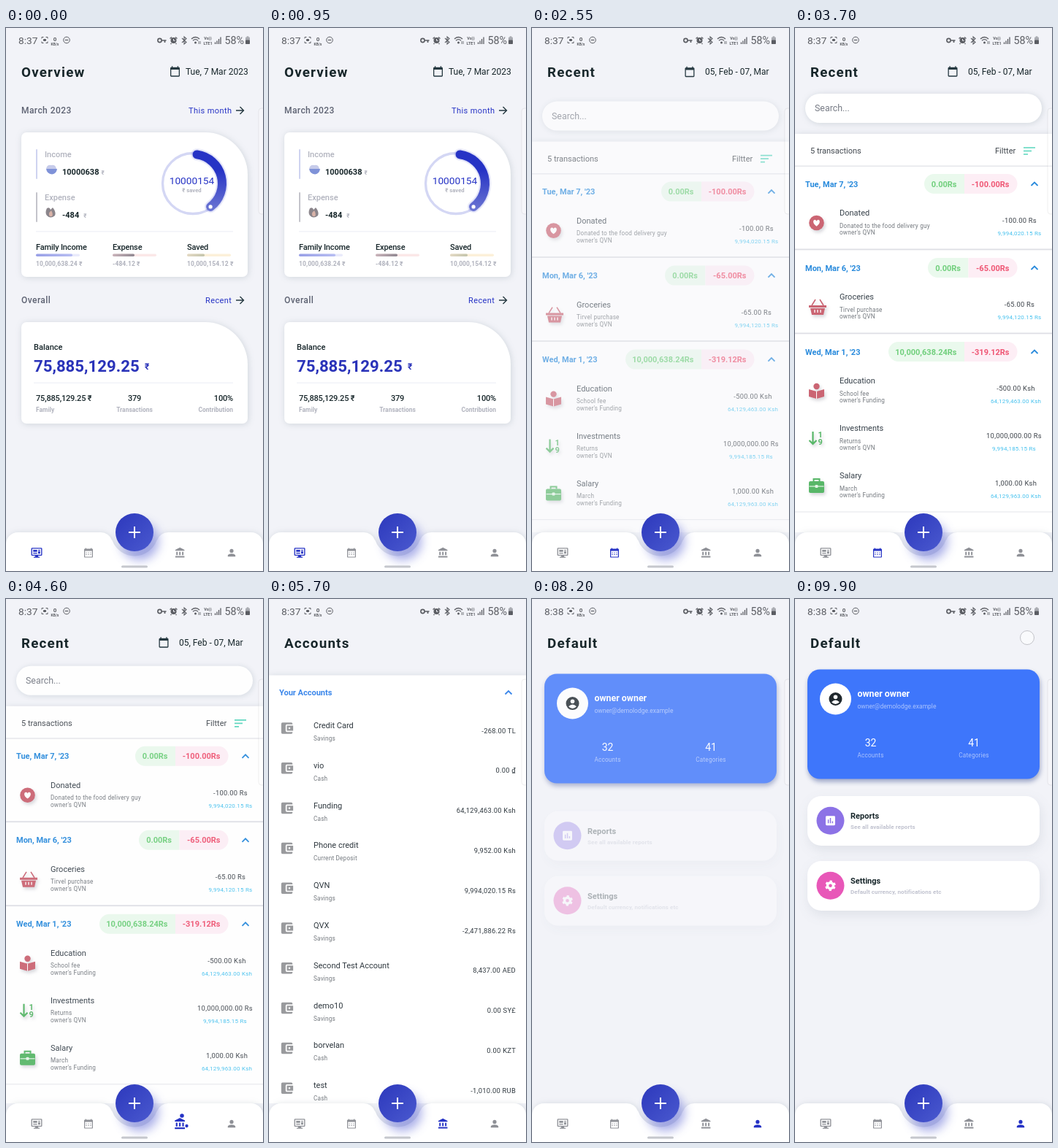
An HTML page for the animation above (10 s loop, 352 by 744 pixels).

```html
<!DOCTYPE html>
<html lang="en">
<head>
<meta charset="utf-8">
<title>Finance app</title>
<style>
  html, body { margin: 0; width: 100%; height: 100%; overflow: hidden; background: #f2f3f8; }
  svg { display: block; width: 100vw; height: 100vh; font-family: Roboto, sans-serif; }
  text { white-space: pre; }
  .card { filter: drop-shadow(1px 1px 4px rgba(58, 81, 96, .18)); }
  .raised { filter: drop-shadow(1px 4px 3px rgba(50, 70, 140, .45)); }
  .option { filter: drop-shadow(2px 6px 8px rgba(58, 81, 96, .1)); }
  .glow { filter: drop-shadow(7px 12px 7px rgba(38, 51, 197, .4)); }
  .soft { filter: drop-shadow(2px 3px 2px rgba(60, 60, 80, .2)); }
</style>
</head>
<body>
<svg id="stage" viewBox="0 0 352 744" xmlns="http://www.w3.org/2000/svg"></svg>
<script>
const INK = '#17262a', BLUE = '#2633c5', GREY = '#b1b3be', LINK = '#2a8bdc', MUTED = '#8f9197';
const BOLD = ' font-weight="700"', MEDIUM = ' font-weight="500"';
const END = ' text-anchor="end"', MID = ' text-anchor="middle"';
const track = n => ` letter-spacing="${n}"`;

const text = (x, y, s, size = 11, fill = INK, attrs = '') =>
  `<text x="${x}" y="${y}" font-size="${size}" fill="${fill}"${attrs}>${s}</text>`;
const rect = (x, y, w, h, fill, r = 0, attrs = '') =>
  `<rect x="${x}" y="${y}" width="${w}" height="${h}" rx="${r}" fill="${fill}" ${attrs}/>`;
const circle = (x, y, r, fill, attrs = '') => `<circle cx="${x}" cy="${y}" r="${r}" fill="${fill}" ${attrs}/>`;
const line = (d, stroke, width = 1, attrs = '') =>
  `<path d="${d}" fill="none" stroke="${stroke}" stroke-width="${width}" ${attrs}/>`;
const shape = (d, fill, attrs = '') => `<path d="${d}" fill="${fill}" ${attrs}/>`;
const at = (x, y, body, attrs = '') => `<g transform="translate(${x} ${y})" ${attrs}>${body}</g>`;
const icon = (d, x, y, scale, fill) =>
  shape(d, fill, `transform="translate(${x} ${y}) scale(${scale}) translate(-12 -12)"`);
const item = (from, body) => `<g class="item" data-from="${from}">${body}</g>`;
const page = (bar, body) => `<g class="page"><g class="bar">${bar}</g>${body}</g>`;
const title = s => text(21, 66.7, s, 18.8, INK, BOLD + track(1.2));
const chevron = (y, color) => line(`M323.5 ${y + 2.5}l4.5-4.5 4.5 4.5`, color, 1.8);
const arrow = y => line(`M315 ${y}h10.5m-5-5l5 5-5 5`, '#253840', 1.4);

const ICONS = {
  date: 'M20 3h-1V1h-2v2H7V1H5v2H4c-1.1 0-2 .9-2 2v16c0 1.1.9 2 2 2h16c1.1 0 2-.9 2-2V5c0-1.1-.9-2-2-2zm0 18H4V8h16v13z',
  monitor: 'M3 2h18a2 2 0 0 1 2 2v12a2 2 0 0 1-2 2h-6v2h3v2H6v-2h3v-2H3a2 2 0 0 1-2-2V4a2 2 0 0 1 2-2zm0 2v12h18V4zM5 6h8v4H5zM15 6h4v2h-4zM15 9h4v5h-4zM5 12h8v2H5z',
  bank: 'M4 10v7h3v-7zm6 0v7h3v-7zM2 22h19v-3H2zm14-12v7h3v-7zm-4.5-9L2 6v2h19V6z',
  person: 'M12 12a4 4 0 1 0 0-8 4 4 0 0 0 0 8zm0 2c-2.67 0-8 1.34-8 4v2h16v-2c0-2.66-5.33-4-8-4z',
  wallet: 'M21 18v1a2 2 0 0 1-2 2H5a2 2 0 0 1-2-2V5a2 2 0 0 1 2-2h14a2 2 0 0 1 2 2v1h-9a2 2 0 0 0-2 2v8a2 2 0 0 0 2 2zm-9-2h10V8H12zm4-2.5a1.5 1.5 0 1 1 0-3 1.5 1.5 0 0 1 0 3z',
  chart: 'M19 3H5a2 2 0 0 0-2 2v14a2 2 0 0 0 2 2h14a2 2 0 0 0 2-2V5a2 2 0 0 0-2-2zM9 17H7v-7h2zm4 0h-2V7h2zm4 0h-2v-4h2z'
};
const cells = [11, 15].map(y => [6, 11, 16].map(x => `M${x} ${y}h2v2h-2z`).join('')).join('');
const TABS = [
  { x: 42, d: ICONS.monitor, scale: .68 }, { x: 113, d: ICONS.date + cells, scale: .6 },
  { x: 238.5, d: ICONS.bank, scale: .66 }, { x: 309, d: ICONS.person, scale: .65 }
];

// Overview
const bigCard = (y, h) =>
  shape(`M28 ${y}H273a58 58 0 0 1 58 58V${y + h - 7}a7 7 0 0 1-7 7H28a7 7 0 0 1-7-7V${y + 7}a7 7 0 0 1 7-7z`, '#fff', 'class="card"');
const heading = (y, left, right, x) =>
  text(21, y, left, 12, '#5d6272', MEDIUM + track(.43)) + text(x, y, right, 11, BLUE, track(.4)) + arrow(y - 4);
const meter = (x, label, value, id, color) =>
  text(x, 304, label, 11, INK, MEDIUM + track(-.17)) + rect(x, 309.5, 60, 3.4, color, 1.7, 'opacity=".2"') +
  rect(x, 309.5, 0, 3.4, `url(#fade-${id})`, 1.7, `id="meter-${id}"`) + text(x, 326, value, 8.5, GREY, BOLD + track(.1));
const flow = (y, label, color, id, gap) =>
  rect(41, y, 2, 41, color, 1) + text(53, y + 11, label, 11, GREY, MEDIUM) +
  `<text x="77" y="${y + 34.5}" font-size="11" fill="${INK}" font-weight="700"><tspan id="${id}"></tspan>` +
  `<tspan dx="${gap}" font-size="8" fill="${GREY}">₹</tspan></text>`;
const pair = (x, value, label, anchor) =>
  text(x, 511, value, 11, INK, MEDIUM + track(-.17) + anchor) + text(x, 526, label, 8.5, GREY, BOLD + anchor);

const bowl = at(62, 194, shape('M-7-1Q-6-7 0-6Q6-7 7-1Z', '#c6cbea') + shape('M-7-1H8Q7 6 1 6.5Q-6 6-7-1Z', '#7f92d8'));
const flame = at(61, 253, shape('M-5-6Q-1-8 0-4L3-7Q8-1 6 4Q0 9-5 4Q-8 0-5-6Z', '#8b858b') +
  shape('M-1 5Q-4 1 1-3Q4 2 2 5Z', '#d9b3a8'));

const overview = page(
  title('Overview') + icon(ICONS.date, 231.5, 59.5, .65, '#253840') + text(246, 63.5, 'Tue, 7 Mar 2023', 12),
  item(0, heading(117, 'March 2023', 'This month', 250)) +
  item(.25, bigCard(143, 198) +
    flow(166, 'Income', '#cfd3f0', 'income', 3) + bowl + flow(225, 'Expense', '#c4c4cb', 'expense', 6) + flame +
    circle(256, 213, 41.5, 'none', 'stroke="#d4d7f4" stroke-width="3.4"') +
    ['#2633c512', '#2633c51c', 'url(#arc-fill)'].map((c, i) =>
      line('', c, [17, 14.5, 12][i], 'class="arc" stroke-linecap="round"')).join('') +
    circle(0, 0, 2.6, '#fff', 'id="knob"') +
    text(254.5, 214, '', 13.7, BLUE, MID + ' id="saved"') + text(254.5, 225, '₹ saved', 7.7, GREY, BOLD + MID) +
    rect(41, 278, 270, 1.6, '#f2f3f8') +
    meter(41, 'Family Income', '10,000,638.24 ₹', 'a', '#8f98e8') +
    meter(146, 'Expense', '-484.12 ₹', 'b', '#e88a8a') +
    meter(248, 'Saved', '10,000,154.12 ₹', 'c', '#f1b440')) +
  item(.37, heading(377, 'Overall', 'Recent', 273)) +
  item(.6, bigCard(403, 139) + text(38, 441, 'Balance', 11, INK, MEDIUM) +
    text(38, 471, '75,885,129.25', 22.2, '#2a33b9', BOLD) + text(190, 468, '₹', 12, '#2a33b9', BOLD) +
    rect(38, 485.5, 273, 1.6, '#f2f3f8') + pair(41, '75,885,129.25 ₹', 'Family', '') +
    pair(176, '379', 'Transactions', MID) + pair(311, '100%', 'Contribution', END)));

// Recent transactions
const RED = '#cb6573', GREEN = '#58b768';
const art = {
  heart: circle(0, 0, 10.3, RED) +
    shape('M0 5.5C-8 0-5-6-2-4.7Q0-4 0-2.5Q0-4 2-4.7C5-6 8 0 0 5.5Z', '#fff', 'transform="scale(.85)"'),
  basket: at(1.5, 1, shape('M-12-3H12V0H-12ZM-10 1H10L8 10H-8Z', RED) +
    line('M-8-3L-3-11M8-3L3-11', RED, 1.6) + line('M-4 3v4M0 3v4M4 3v4', '#fff', 1.3)),
  reader: circle(0, -6, 4.2, RED) + shape('M0 1L-10.5-2V8L0 11L10.5 8V-2Z', RED) + line('M0 1V11', '#fff', 1),
  growth: line('M-5-9V7M-10 3l5 5 5-5', GREEN, 2.2) + text(2, -1, '1', 11, GREEN, BOLD) + text(2, 9, '9', 11, GREEN, BOLD),
  briefcase: rect(-10.5, -6, 21, 16, GREEN, 2) + line('M-4-6V-9H4V-6', GREEN, 2) +
    line('M-10 1H10', '#e4f5e7', 1.2) + rect(-2, -1, 4, 4, '#e4f5e7', 1)
};
const group = (y, day, left, split, plus, minus) =>
  text(14, y + 4, day, 11, LINK, BOLD) +
  shape(`M${split} ${y - 13.5}H${left + 13.5}a13.5 13.5 0 0 0 0 27H${split}z`, '#eaf9ed') +
  shape(`M${split} ${y - 13.5}H291a13.5 13.5 0 0 1 0 27H${split}z`, '#fdeef5') +
  text(split - 10.5, y + 4, plus, 11, '#70cf7c', BOLD + END) + text(293.5, y + 4, minus, 11, '#ef5674', BOLD + END) +
  chevron(y, LINK);
const entry = (y, name, note, account, amount, balance, mid, picture) =>
  at(29.5, y + 10, art[picture], 'class="soft"') + text(61, y, name, 11, '#37414a') +
  text(61, y + 16.5, note, 8.2, '#74797f', track(.2)) + text(61, y + 26, `owner's ${account}`, 8.2, '#74797f', track(.2)) +
  text(mid, y + 10, amount, 9.4, '#3b4148', MID + track(.25)) + text(mid, y + 27, balance, 8, '#45c1ee', MID + track(.2));

const recent = page(
  title('Recent') + icon(ICONS.date, 216, 59.5, .65, '#253840') + text(237, 63.5, '05, Feb - 07, Mar', 12),
  item(0, rect(14, 90, 324, 40, '#fff', 20, 'class="card"') + text(27, 114, 'Search...', 12.4, '#777b85') +
    rect(0, 145, 352, 560, '#fff', 0, 'class="card"') + text(21, 172, '5 transactions', 11, '#42484f') +
    text(274, 172, 'Filtter', 11, '#42484f') + line('M313 164h16M313 168.5h11M313 173h6', '#5ad6bd', 1.7) +
    rect(0, 188.5, 352, 1.4, '#e4e5ea') + rect(0, 302.5, 352, 1.8, '#dedfe5') + rect(0, 417.5, 352, 1.8, '#dedfe5') +
    rect(0, 662.5, 352, 1, '#e4e5ea') +
    group(213.5, "Tue, Mar 7, '23", 177, 232, '0.00Rs', '-100.00Rs') +
    entry(257, 'Donated', 'Donated to the food delivery guy', 'QVN', '-100.00 Rs', '9,994,020.15 Rs', 307.5, 'heart') +
    group(328.5, "Mon, Mar 6, '23", 182, 237.5, '0.00Rs', '-65.00Rs') +
    entry(372, 'Groceries', 'Tirvel purchase', 'QVN', '-65.00 Rs', '9,994,120.15 Rs', 307.5, 'basket') +
    group(443.5, "Wed, Mar 1, '23", 128, 232, '10,000,638.24Rs', '-319.12Rs') +
    entry(487, 'Education', 'School fee', 'Funding', '-500.00 Ksh', '64,129,463.00 Ksh', 302.5, 'reader') +
    entry(552, 'Investments', 'Returns', 'QVN', '10,000,000.00 Rs', '9,994,185.15 Rs', 300, 'growth') +
    entry(617, 'Salary', 'March', 'Funding', '1,000.00 Ksh', '64,129,963.00 Ksh', 302.5, 'briefcase')));

// Accounts
const ACCOUNTS = [
  ['Credit Card', 'Savings', '-268.00 TL'], ['vio', 'Cash', '0.00 ₫'], ['Funding', 'Cash', '64,129,463.00 Ksh'],
  ['Phone credit', 'Current Deposit', '9,952.00 Ksh'], ['QVN', 'Savings', '9,994,020.15 Rs'],
  ['QVX', 'Savings', '-2,471,886.22 Rs'], ['Second Test Account', 'Savings', '8,437.00 AED'],
  ['demo10', 'Savings', '0.00 SY£'], ['borvelan', 'Cash', '0.00 KZT'], ['test', 'Cash', '-1,010.00 RUB']
];
const accounts = page(title('Accounts'),
  item(0, rect(0, 104.5, 352, 600, '#fff', 0, 'class="card"') + text(14, 132, 'Your Accounts', 11, '#3a86ea', BOLD) +
    chevron(128, '#3a86ea') + ACCOUNTS.map(([name, kind, sum], i) => at(0, 54.8 * i,
      icon(ICONS.wallet, 24.5, 177, .86, '#999a9d') + text(61, 177, name, 11, '#2f383f') +
      text(61, 194, kind, 8.2, '#74797f', track(.2)) + text(338, 183.5, sum, 9.4, '#2f383f', END + track(.25)))).join('')));

// Profile
const gear = circle(0, 0, 4, 'none', 'stroke="#fff" stroke-width="3.4"') +
  circle(0, 0, 6, 'none', 'stroke="#fff" stroke-width="2.6" stroke-dasharray="3.1 3.183" transform="rotate(15)"');
const option = (y, color, picture, name, note) => item(1 / 3,
  rect(17, y, 318, 68, '#fff', 19, 'class="option"') + circle(48.5, y + 33.7, 19, color) + at(48.5, y + 33.7, picture) +
  text(76, y + 31, name, 11, INK, BOLD) + text(76, y + 45, note, 8, '#c0c2cf', BOLD + track(.1)));
const stat = (x, n, label) => text(x, 201.5, n, 14, '#fff', MID) +
  text(x, 216.5, label, 8.2, '#ffffff90', MID + track(.2));
const profile = page(title('Default'),
  item(0, rect(17, 96.5, 318, 150, '#3e76fb', 17, 'class="raised"') + circle(55.5, 137, 21.5, '#fff') +
    at(55.5, 137, circle(0, 0, 9, '#20282d') + circle(0, -2.7, 2.8, '#fff') + shape('M-5.4 4.2Q0-1 5.4 4.2Q0 10-5.4 4.2Z', '#fff')) +
    text(85.5, 134, 'owner owner', 12.4, '#fff', BOLD) +
    text(85.5, 150, 'owner@demolodge.example', 8.5, '#ffffff90') + stat(103.5, '32', 'Accounts') + stat(245, '41', 'Categories')) +
  option(270, '#8c72e6', icon(ICONS.chart, 0, 0, .72, '#fff'), 'Reports', 'See all available reports') +
  option(359, '#e857b8', gear, 'Settings', 'Default currency, notifications etc'));

// Fixed chrome
const STATUS = '#5b5d63';
const statusBar =
  text(17, 21.5, '8:37', 13.7, STATUS, ' id="clock"') +
  line('M49 14.5V12.5H51.5M54.5 12.5H57V14.5M57 18.5V20.5H54.5M51.5 20.5H49V18.5', STATUS, 1) + rect(51, 15, 4, 3, STATUS, 1) +
  text(67, 18, '0', 8, STATUS, BOLD + MID) + text(67, 23.5, 'KB/s', 5, STATUS, BOLD + MID) +
  circle(83, 16.5, 4.3, 'none', `stroke="${STATUS}"`) + line('M80.7 16.5H85.3', STATUS, 1.2) +
  circle(210.5, 17, 2.6, 'none', `stroke="${STATUS}" stroke-width="1.6"`) + line('M213 17H219.5M217.5 17V20', STATUS, 1.7) +
  circle(229.5, 17, 4, STATUS) + line('M224.5 14.5L227 12.5M234.5 14.5L232 12.5M226.5 21L225.5 22M232.5 21L233.5 22', STATUS, 1.3) +
  line('M229.5 15V17.3H231.5', '#f2f3f8', 1) +
  line('M241 14L247 19.5L244 22V12L247 14.5L241 20', STATUS, 1.1) +
  line('M254 15Q259.5 10 265 15M256 17.3Q259.5 14 263 17.3', STATUS, 1.3) + circle(259.5, 20, 1.5, STATUS) +
  line('M264 18v4M266 22v-4', STATUS, .8) +
  text(276.5, 16, 'Vo))', 5.5, STATUS, BOLD + MID) + text(276.5, 22.5, 'LTE1', 5.5, STATUS, BOLD + MID) +
  line('M286.5 22v-2.5M289 22v-4.5M291.5 22v-7M294 22v-9.5', STATUS, 1.3) +
  text(299.5, 21.5, '58%', 14.3, STATUS) + rect(328, 12.5, 6, 9.5, '#a9abb1', 1) + rect(328, 16.5, 6, 5.5, STATUS, 1) + rect(329.7, 11.3, 2.6, 2, '#a9abb1');

const navBar =
  shape('M0 744V707.25A16.25 16.25 0 0 1 16.25 691H129.9A16.25 16.25 0 0 1 145.1 701.7L145.5 702.1A32.5 32.5 0 0 0 206.5 702.1L206.9 701.7A16.25 16.25 0 0 1 222.1 691H335.75A16.25 16.25 0 0 1 352 707.25V744Z',
    '#fff', 'class="card"') +
  TABS.map(({ x, d, scale }) => at(x, 719, `<g class="glyph">${icon(d, 0, 0, scale, 'currentColor')}</g>` +
    `<g class="dots">${circle(2.5, -11, 0, BLUE)}${circle(-11, -3, 0, BLUE)}${circle(9, 3, 0, BLUE)}</g>`, 'class="tab"')).join('') +
  circle(176, 691, 26, 'url(#fab)', 'class="glow"') + line('M168 691H184M176 683V699', '#fff', 2) +
  rect(158, 736.5, 36, 3, '#c5c7cd', 1.5);

const gradient = (id, from, to, attrs) =>
  `<linearGradient id="${id}" ${attrs}><stop stop-color="${from}"/><stop offset="1" stop-color="${to}"/></linearGradient>`;
const stage = document.getElementById('stage');
stage.innerHTML = '<defs>' + gradient('fab', '#2c38bc', '#4a59cf', 'x2="1" y2="1"') +
  gradient('arc-fill', BLUE, '#7f88d6', 'gradientUnits="userSpaceOnUse" x1="0" y1="195" x2="0" y2="266"') +
  gradient('fade-a', '#989fe6', '#b7bdf2', '') + gradient('fade-b', '#c9b3ba', '#8f8790', '') + gradient('fade-c', '#e3d9c4', '#c3c4ab', '') +
  '<clipPath id="body"><path d="M0 0H352V691H0Z"/></clipPath></defs>' + rect(0, 0, 352, 744, '#f2f3f8') +
  `<g clip-path="url(#body)">${overview}${recent}${accounts}${profile}</g>` +
  rect(346, 110, 9, 145, '#ffffff40', 4, 'stroke="#00000010"') + statusBar + navBar +
  circle(318, 53, 9.5, '#ffffff90', 'stroke="#c2c3c8" id="touch"');

const find = id => document.getElementById(id);
const all = selector => [...stage.querySelectorAll(selector)];
const pages = all('.page'), tabs = all('.tab'), arcs = all('.arc');

// Motion
const LOOP = 10000, STEP = 50, TAP_MS = 400, PAGE_MS = 600;
const SWITCHES = [{ tap: 1009.388, show: 2300 }, { tap: 4022, show: 5100 }, { tap: 6800, show: 7888 }];
const clamp = x => Math.min(1, Math.max(0, x));

// cubic-bezier(.4, 0, .2, 1)
function ease(x) {
  if (x <= 0 || x >= 1) return clamp(x);
  let low = 0, high = 1;
  for (let i = 0; i < 40; i++) {
    const s = (low + high) / 2, r = 1 - s;
    if (1.2 * s * r * r + .6 * s * s * r + s ** 3 < x) low = s; else high = s;
  }
  return low * low * (3 - 2 * low);
}
const interval = (t, from, to = 1) => ease(clamp((t - from) / (to - from)));

function reveal(node, v) {
  node.setAttribute('opacity', v);
  node.setAttribute('transform', `translate(0 ${30 * (1 - v)})`);
}

function updateOverview(v) {
  find('income').textContent = Math.trunc(10000638.24 * v);
  find('expense').textContent = Math.trunc(-484.12 * v);
  find('saved').textContent = Math.trunc(10000154.12 * v);
  const point = deg => {
    const a = deg * Math.PI / 180;
    return [256 + 40 * Math.sin(a), 213 - 40 * Math.cos(a)];
  };
  const sweep = 135 + 220 * (1 - v), tip = point(8 + sweep);
  const d = `M${point(8)}A40 40 0 ${sweep > 180 ? 1 : 0} 1 ${tip}`;
  arcs.forEach(arc => arc.setAttribute('d', d));
  find('knob').setAttribute('cx', tip[0]);
  find('knob').setAttribute('cy', tip[1]);
  [['a', 50], ['b', 30], ['c', 24]].forEach(([id, w]) => find('meter-' + id).setAttribute('width', w * v));
}

function render(time) {
  let current = 0, selected = 0, progress = 1;
  const pops = [0, 0, 0, 0];
  SWITCHES.forEach(({ tap, show }, i) => {
    const leave = tap + TAP_MS, swap = leave + PAGE_MS;
    pops[i + 1] = clamp(1 - Math.abs(time - leave) / TAP_MS);
    if (time >= leave) { selected = i + 1; progress = clamp(1 - (time - leave) / PAGE_MS); }
    if (time >= swap) { current = i + 1; progress = clamp((time - show) / PAGE_MS); }
  });

  pages.forEach((node, i) => node.setAttribute('display', i === current ? 'inline' : 'none'));
  reveal(pages[current].querySelector('.bar'), interval(progress, 0, .5));
  pages[current].querySelectorAll('.item').forEach(node => reveal(node, interval(progress, +node.dataset.from)));
  if (current === 0) updateOverview(interval(progress, .25));

  tabs.forEach((tab, i) => {
    const p = pops[i];
    tab.setAttribute('color', i === selected ? BLUE : MUTED);
    tab.querySelector('.glyph').setAttribute('transform', `scale(${1 + .136 * interval(p, .1)})`);
    const radii = [4 * interval(p, .2), 1.7 * interval(p, .5, .8), 2.6 * interval(p, .5, .6)];
    tab.querySelectorAll('.dots circle').forEach((dot, k) => dot.setAttribute('r', radii[k]));
  });

  find('clock').textContent = time < 6150 ? '8:37' : '8:38';
  find('touch').setAttribute('display', time >= 9850 ? 'inline' : 'none');
}

// The picture advances in steps of 50 ms; the small lead absorbs timer jitter.
const start = performance.now();
function tick() {
  const elapsed = performance.now() - start + 2;
  render(Math.floor(elapsed / STEP) * STEP % LOOP);
  requestAnimationFrame(tick);
}
tick();
</script>
</body>
</html>
```
